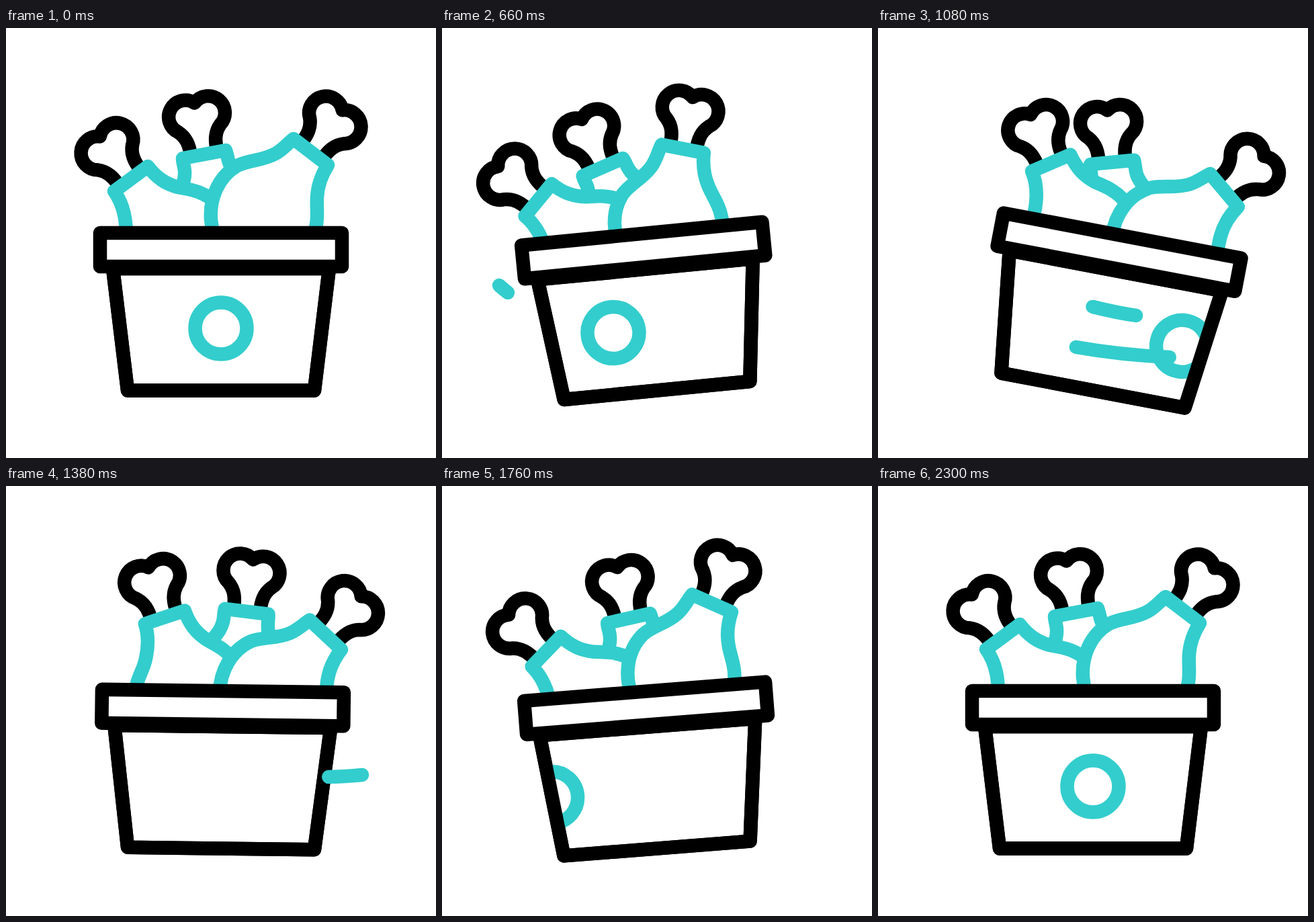
An HTML page for the animation above (2.4 s loop, 640x640 px).

```html
<!DOCTYPE html>
<html lang="en">
<head>
<meta charset="utf-8">
<title>Chicken bucket</title>
<style>
  html, body { margin: 0; width: 100%; height: 100%; overflow: hidden; background: #fff; }
  svg { display: block; width: 100%; height: 100%; }
  .ink, .teal { fill: #fff; stroke-width: 20.5; stroke-linecap: round; stroke-linejoin: round; }
  .ink { stroke: #000; }
  .teal { stroke: #33cdcd; }
  .open { fill: none; }
</style>
</head>
<body>
<svg viewBox="0 0 640 640">
  <defs>
    <path id="bone" class="ink" d="M-20 0C-19 -18 -22 -30 -32 -39.5A25 25 0 1 1 0 -77.8A25 25 0 1 1 32 -39.5C22 -30 19 -18 20 0"/>
    <path id="tub" d="M159 358L181 539.5H459L481 358Z"/>
    <clipPath id="inside"><use href="#tub"/></clipPath>
  </defs>
  <g id="bucket">
    <g id="mid">
      <use href="#bone" transform="translate(295 188) rotate(-10.6)"/>
      <path class="teal" d="M225 300C240 270 268 240 266 214C266 207 263 201 263 194L327 182C330 190 330 197 334 205C342 221 365 235 385 275"/>
    </g>
    <g id="left">
      <use href="#bone" transform="translate(185.5 224.5) rotate(-36)"/>
      <path class="teal" d="M180 350C174 325 180 312 178.500 295C177 275 172 258 161 243L211 206C225 224 238 232 256 237C270 240 285 241 302 252C325 266 340 285 348 315"/>
    </g>
    <g id="right">
      <use href="#bone" transform="translate(454 184.5) rotate(36.9)"/>
      <path class="teal" d="M322 350C312 325 307 305 305 285C303 255 315 222 344 205C362 196 381 198 401 187C412 181 420 171 428 165L479 204C472 215 464 233 463 252C462 268 465 283 461 297C458 315 450 330 445 345"/>
    </g>
    <use href="#tub" class="ink"/>
    <g clip-path="url(#inside)"><circle id="badge" class="teal" cx="320" cy="447" r="38.5"/></g>
    <use href="#tub" class="ink open"/>
    <rect class="ink" x="140" y="305" width="360" height="50"/>
  </g>
  <path id="low" class="teal open" pathLength="1" d="M85 383C150 441 245 464 295 475C340 483 390 488 434 490C480 492 520 490 560 484"/>
  <path id="high" class="teal open" pathLength="1" d="M120 340C180 375 260 403 320 415C340 420 362 425 385 428C420 433 450 434 480 433C500 432.500 515 431.500 530 430"/>
</svg>
<script>
const LOOP = 2400, STEP = 20, DELAY = 100;
const el = id => document.getElementById(id);

// Smooth track through [step, value] pairs, flat at every turning point.
function track(...keys) {
  const slope = i => (keys[i + 1][1] - keys[i][1]) / (keys[i + 1][0] - keys[i][0]);
  const tangent = i => {
    if (i === 0 || i === keys.length - 1) return 0;
    const a = slope(i - 1), b = slope(i);
    return a * b > 0 ? 2 * a * b / (a + b) : 0;
  };
  return n => {
    if (n <= keys[0][0]) return keys[0][1];
    const i = keys.findIndex((k, j) => j < keys.length - 1 && n < keys[j + 1][0]);
    if (i < 0) return keys[keys.length - 1][1];
    const [x, y] = keys[i], w = keys[i + 1][0] - x, u = (n - x) / w;
    const ease = u * u * (3 - 2 * u);
    return y + (keys[i + 1][1] - y) * ease
      + w * u * (1 - u) * ((1 - u) * tangent(i) - u * tangent(i + 1));
  };
}

const tilt = track([0, 0], [14, -3.3], [23, -7], [28, -5.55], [46, 11.4], [49, 10.75],
  [54, 9.1], [64, .72], [83, -4.5], [89, -6], [106, 0]);

const legs = [
  { node: el('mid'), pivot: '330 385',
    turn: track([0, 0], [14, -.4], [28, -7.6], [37, -12], [49, -5.5], [64, 16.9], [68, 18.5], [83, 2.4], [94, -5], [110, 0]),
    dx: track([0, 0], [28, 2.7], [49, 8.5], [64, 0], [83, 1.7], [110, 0]),
    dy: track([0, 0], [28, 6.5], [49, 8.2], [64, 0], [83, 8], [110, 0]) },
  { node: el('left'), pivot: '295 345',
    turn: track([0, 0], [14, -3.2], [28, -8.4], [33, -10], [49, 2.6], [64, 17.4], [66, 17.8], [83, -5.1], [85, -5.3], [108, 0]),
    dx: track([0, 0], [28, 2], [49, 4], [64, 5], [83, 3], [108, 0]),
    dy: track([0, 0], [28, -1.5], [64, -1], [108, 0]) },
  { node: el('right'), pivot: '425 350',
    turn: track([0, 0], [14, -7.8], [28, -20.8], [32, -23], [49, 1.6], [57, 6], [64, 4.9], [83, -9.1], [86, -9.6], [106, 0]),
    dx: track([0, 0], [28, 0], [49, -2], [64, 4], [83, 3], [106, 0]),
    dy: track([28, 0], [49, 25], [59, 34], [64, 32], [83, 0]) }
];

// The badge leaves on the right and comes back from the left.
const badgeOut = track([0, 0], [14, -25.8], [28, -56.4], [30, -58], [49, 118], [60, 260]);
const badgeIn = track([68, -260], [83, -150], [106, 0]);

const streaks = [
  { node: el('low'), tail: track([33, 0], [49, .465], [61, 1]), head: track([26, 0], [28, .034], [49, .746], [56, 1]) },
  { node: el('high'), tail: track([37, 0], [49, .502], [64, .883], [68, 1]), head: track([33, 0], [49, .657], [60, 1]) }
];

function draw(n) {
  el('bucket').setAttribute('transform', `rotate(${tilt(n)} 320 539.5)`);
  for (const { node, pivot, turn, dx, dy } of legs)
    node.setAttribute('transform', `translate(${dx(n)} ${dy(n)}) rotate(${turn(n)} ${pivot})`);
  const x = n < 64 ? badgeOut(n) : badgeIn(n);
  el('badge').setAttribute('transform', `translate(${x} ${x * x * .0002})`);
  for (const { node, tail, head } of streaks) {
    const from = tail(n), size = head(n) - from;
    node.style.visibility = size > .001 ? 'visible' : 'hidden';
    node.setAttribute('stroke-dasharray', `${Math.max(size, 0)} 3`);
    node.setAttribute('stroke-dashoffset', -from);
  }
}

const start = performance.now();
function frame() {
  const t = Math.max(0, performance.now() - start) % LOOP;
  draw(Math.min(110, Math.max(0, Math.floor((t - DELAY) / STEP))));
  requestAnimationFrame(frame);
}
frame();
</script>
</body>
</html>
```
